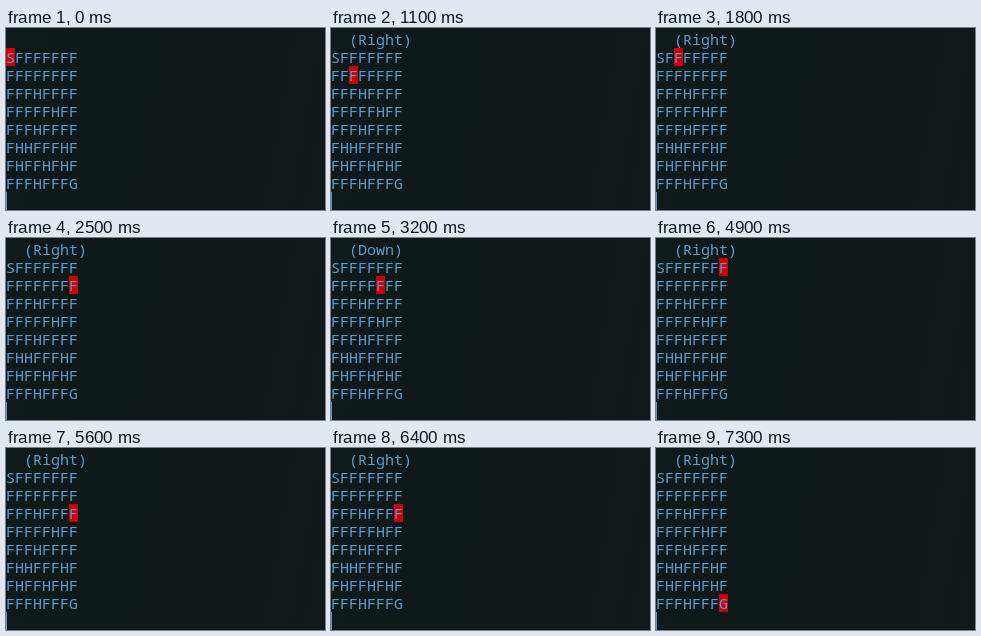
An HTML page that plays this animation: 319x182 px, repeating every 9.2 s.

```html
<!DOCTYPE html>
<html lang="en">
<head>
<meta charset="utf-8">
<title>Grid walk</title>
<style>
  html, body { margin: 0; width: 100%; height: 100%; overflow: hidden; }
  body {
    position: relative;
    background: linear-gradient(100deg, #0f1a1b 0%, #101819 55%, #13181a 88%, #10191a 100%);
  }
  pre {
    position: absolute; left: 0; top: 2px; margin: 0;
    font: 15px/18px "Noto Sans Mono", "DejaVu Sans Mono", monospace;
    font-variant-ligatures: none;
    color: #5c9bd0;
  }
  #mark { position: absolute; left: 0; top: 20px; width: 9px; height: 18px; background: #cc0000; }
  #caret { position: absolute; left: 0; top: 164px; width: 1px; height: 18px; background: #5c9bd0; }
</style>
</head>
<body>
<div id="mark"></div>
<pre id="text"></pre>
<div id="caret"></div>
<script>
  const LOOP = 9200, START = 500, STEP = 100;
  const CELL_W = 9, CELL_H = 18;
  const MAP = ["SFFFFFFF", "FFFFFFFF", "FFFHFFFF", "FFFFFHFF",
               "FFFHFFFF", "FHHFFFHF", "FHFFHFHF", "FFFHFFFG"].join("\n");
  const ACTIONS = { U: "Up", R: "Right", D: "Down", L: "Left" };

  // One token per step: action, row, column; "." holds the last one.
  const walk = `
    U01 R11 U01 R11 U12 U02 R12 U11 L10 U10 .
    U11 U01 R02 R03 R04 R05 .
    R15 U16 R17 R27 R17 R07 .
    U06 R16 D15 U14 U04 R05 R15 U05 R06 R16 D26 R27 R17 .
    R07 R17 R27 R37 R17 R07 .
    U06 . . U07 R17 R27 .
    R17 R37 . .
    R27 U26 R27 .
    R37 D47 R57 .
    R67 . . R77`.trim().split(/\s+/);

  const states = [{ label: "", row: 0, col: 0 }];
  for (const token of walk) {
    states.push(token === "." ? states[states.length - 1] : {
      label: `  (${ACTIONS[token[0]]})`, row: +token[1], col: +token[2]
    });
  }

  const mark = document.getElementById("mark");
  const text = document.getElementById("text");
  let shown = null;

  function draw(time) {
    const index = Math.floor((time - START) / STEP) + 1;
    const state = states[Math.max(0, Math.min(index, states.length - 1))];
    if (state === shown) return;
    shown = state;
    text.textContent = (state.label || " ") + "\n" + MAP;
    mark.style.transform = `translate(${state.col * CELL_W}px, ${state.row * CELL_H}px)`;
  }

  const origin = performance.now();
  function tick() {
    draw((performance.now() - origin) % LOOP);
    requestAnimationFrame(tick);
  }
  tick();
</script>
</body>
</html>
```
